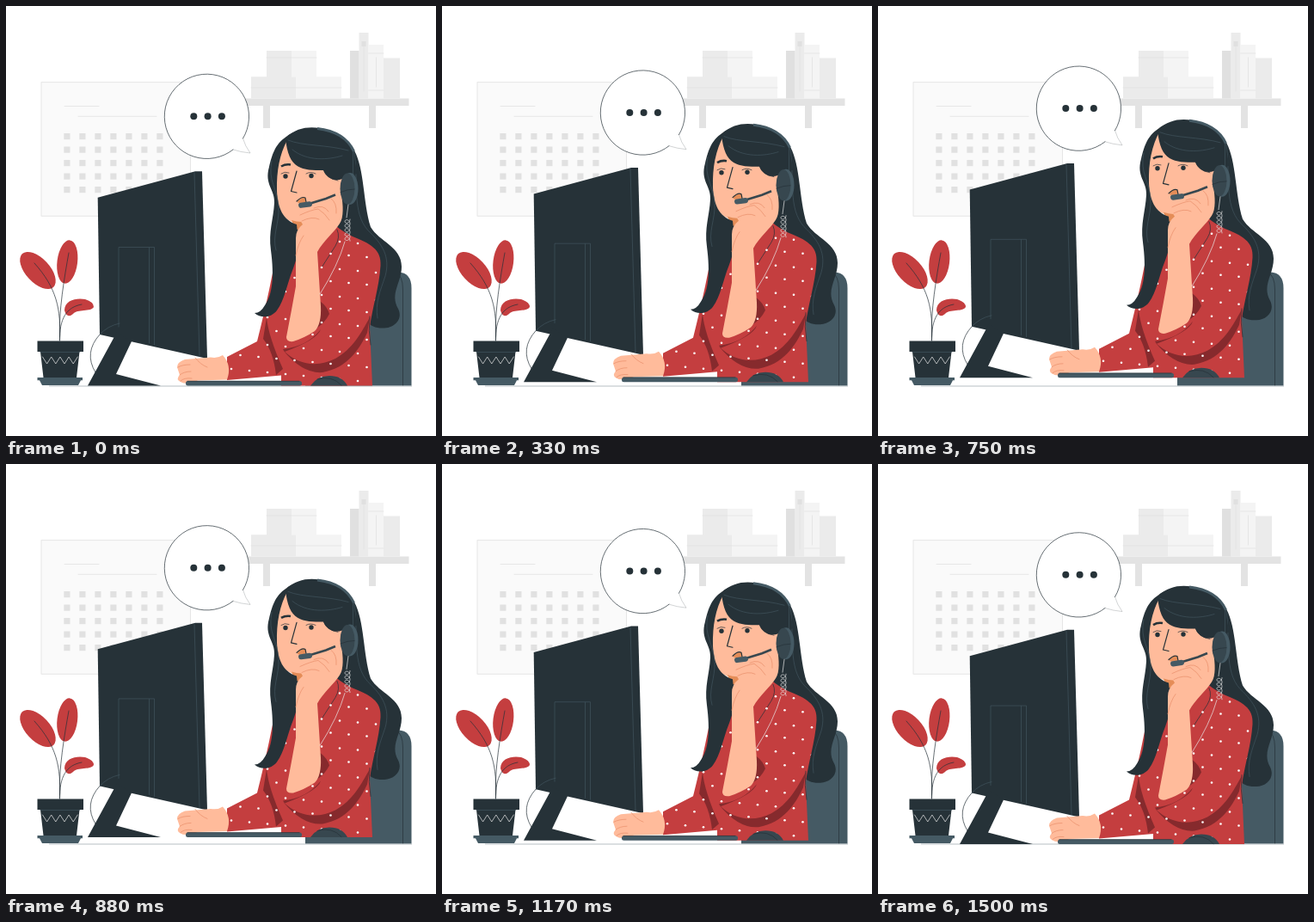
Write an HTML page that moves like this. It is 500 px wide and 500 px high and loops after 1.54 s.

```html
<!DOCTYPE html>
<html lang="en">
<head>
<meta charset="utf-8">
<title>Support agent</title>
<style>
html, body { margin: 0; width: 100%; height: 100%; overflow: hidden; background: #fff; }
svg { display: block; width: 100vw; height: 100vh; }
.dark { fill: #263238; }
.slate { fill: #455a64; }
.mid { fill: #37474f; }
.red { fill: #c43e3f; }
.shade { fill: #862a2d; }
.skin { fill: #ffbb9b; }
.tan { fill: #e58d58; }
.line, .soft, .crease, .pale, .wire { fill: none; stroke-linecap: round; stroke-linejoin: round; }
.line { stroke: #263238; stroke-width: .7; }
.bold { stroke-width: 1.2; }
.brow { stroke-width: 2.6; stroke-linecap: butt; }
.soft { stroke: #455a64; stroke-width: .6; }
.crease { stroke: #e98f6b; stroke-width: .7; }
.pale { stroke: #e0e0e0; stroke-width: .7; }
.wire { stroke: #e8e8e8; stroke-width: .7; }
</style>
</head>
<body>
<svg viewBox="0 0 500 500">
  <defs>
    <path id="blouse" d="M314 291L331 286L384 256Q391 262 403 268C423 276 437 283 435.500 302C434 327 426 350 423 374L426 441.500H320V429.500L257 435V408L292 390Q300 358 306 330z"/>
    <clipPath id="blouseClip"><use href="#blouse"/></clipPath>
  </defs>

  <g id="wall">
    <rect x="41" y="88.700" width="173.500" height="155.500" fill="#fafafa" stroke="#e0e0e0" stroke-width=".8"/>
    <path class="pale" d="M68 116.500h40M84 128.300h91"/>
    <g id="days" fill="#e1e1e1"></g>
    <path fill="#e3e3e3" d="M278 107.500h190.500v8.500H278zM299 116h8v26h-8zM422 116h8v26h-8z"/>
    <path fill="#ebebeb" d="M285 82.300h52v25.200h-52zM303 52h29v30.300h-29zM410.500 31h11v76.500h-11zM439 60.500h19v47h-19z"/>
    <path fill="#f4f4f4" d="M337 82.300h53v25.200h-53zM332 52h29v30.300h-29zM421.500 45h17.500v62.500h-17.500z"/>
    <path fill="#e0e0e0" d="M400 52h10.500v55.500H400zM413.500 41h5v6h-5z"/>
    <path class="pale" d="M303 60h58M285 95h105M416 47v52M421.500 55H439M421.500 98H439M430.500 60v34"/>
  </g>

  <g id="chair">
    <path class="slate" d="M415 309.500H456Q471.500 310 471.500 328V441.500H348V431H415z"/>
    <path class="line" d="M453 309.500Q461.500 313 461.500 330V441"/>
  </g>

  <g id="plant">
    <ellipse class="red" rx="26.500" ry="14" transform="translate(37 307.500) rotate(47)"/>
    <ellipse class="red" rx="25.300" ry="11.800" transform="translate(71.300 297.500) rotate(97)"/>
    <path class="red" d="M68 354C68 342 82 339 92 341Q102 344 102 350C99 356 83 352 78 358Q71 364 68 354z"/>
    <path class="line" d="M62.500 389C64 352 59 328 33 299M62.500 385C61 355 68 315 73 287M62.500 389C62 364 70 350 88 347"/>
    <path class="dark" d="M36.500 389.500H90V402H85.500L82 432H43.500L40 402H36.500z"/>
    <path class="soft" d="M40 402.500H85.500"/>
    <path id="zigzag" class="wire"/>
    <path class="slate" d="M36.500 432H89V435.300H87L84 441H42L39 435.300H36.500z"/>
  </g>

  <path d="M50 442H472" stroke="#9aa5ab" stroke-width=".7"/>

  <g id="float">
    <g id="bubble">
      <path fill="#fff" d="M264 167A49.200 49.200 0 1 1 275.500 154Q278 163 284 171Q273 170 264 167z"/>
      <path class="line" d="M264 167A49.200 49.200 0 1 1 275.500 154"/>
      <path class="line" stroke-opacity=".3" d="M275.500 154Q278 163 284 171Q273 170 264 167"/>
      <g id="typing" class="dark"></g>
    </g>

    <g id="hairBack">
      <path class="dark" d="M326 152C345 137 388 139 405 168C417 190 415 228 424 257C434 274 460 280 460 303C460 322 446 334 456 352C462 364 452 374 440 374.500C430 375 424 372 420 367L395 300H338V200z"/>
      <path class="soft" d="M405 170C410 205 402 240 421 261C438 277 447 292 441 314C435 332 429 345 432 363"/>
    </g>

    <g id="shirt">
      <use href="#blouse" class="red"/>
      <path class="shade" d="M303 362Q305 384 322 422L314 429Q311 402 299 387z"/>
      <path class="shade" d="M322 400C342 420 365 419 383 410C403 399 413 380 423 362L420 380C411 399 397 421 368 426Q345 428 322 400z"/>
      <path class="shade" d="M365 343Q374 350 376 358Q371 368 362 374zM322 399Q350 396 366 376Q362 388 324 402z"/>
      <path class="line" d="M385 260Q389 269 383 279L367 304M423 361Q421 377 424 394"/>
      <g id="spots" fill="#fff" clip-path="url(#blouseClip)"></g>
    </g>

    <g id="head">
      <path class="skin" d="M326 152C312 180 312 215 317 236Q325 254 349 253L384 247L394 210L388 170L355 148z"/>
      <path class="tan" d="M332 249Q346 254 359 247L357 260H336z"/>
      <path class="dark" d="M326 152C312 161 309 175 306 187C300 208 313 213 312 229C311 248 305 262 308 284C312 315 310 335 301 348Q296 357 289 357C297 364 309 362 315 354C324 342 326 325 334 305L341 284L338 254C322 249 316 235 315 215Q314 180 327 156z"/>
      <path class="soft" d="M309 180C304 204 316 212 317 234C318 252 309 268 314 284"/>
      <path class="dark" d="M325 153C338 142 350 140 365 142C392 146 406 166 408 195L391 201C381 205 372 199 369 191C345 191 328 191 325 153z"/>
      <path class="line" d="M369 190Q373 201 386 203"/>
      <path class="soft" d="M328 156C345 163 373 161 398 168M333 167C350 181 375 179 391 174"/>
      <path class="line brow" d="M320 186.500Q325 183.500 331 184.500"/>
      <g class="dark"><circle cx="325" cy="198" r="2.700"/><circle cx="355" cy="197.500" r="2.700"/></g>
      <path class="line" d="M320 195Q324 192 329 194M349 195Q354 192 360 195"/>
      <path class="line bold" d="M338 192L331.500 215.500L338 217"/>
      <path class="tan" d="M338 227Q345 221 348 223L349 229H340z"/>
      <path class="line bold" d="M338 227Q344 221 348 223L349 228"/>
    </g>

    <g id="arm">
      <path class="skin" d="M390 219C392 231 393 246 388 253C381 264 369 273 362 286L366 349Q367 370 359 378Q347 386 334 390Q326 391 326 385Q332 354 337 326V270Q337 260 345 254Q339 245 342 241L374 224Q383 219 387 212z"/>
      <path class="crease" d="M342 243Q355 237 363 236Q371 241 376 249M358 235Q369 230 375 239M344 250Q356 244 364 248M378 224Q385 229 384 241M337 290Q340 275 346 267"/>
    </g>

    <g id="headset">
      <path d="M362 142.500C384 145 398 155 404.500 169" fill="none" stroke="#455a64" stroke-width="3"/>
      <path class="soft" d="M403.500 167V196"/>
      <ellipse class="slate" cx="400" cy="212.500" rx="9.500" ry="18.500"/>
      <ellipse class="mid" cx="397" cy="212.500" rx="8.500" ry="18"/>
      <path d="M354 229.500L372 224L383 219.500" fill="none" stroke="#37474f" stroke-width="2.600"/>
      <path class="line" d="M389 216.500Q397 213 405 213"/>
      <rect class="slate" x="340" y="228" width="16" height="6.200" rx="3" transform="rotate(-8 348 231)"/>
      <path id="coil" class="wire"/>
      <path class="wire" d="M398 231L396 246M394 274Q386 302 365 335"/>
    </g>

    <g id="desk">
      <path class="dark" d="M106.700 222.800L220 192.200H228L234 410L109 382z"/>
      <path class="soft" d="M219 194L225 407M131 373V280.500H172.500V394M166.500 281V392"/>
      <path class="dark" d="M129 379L146 390L128 428L180 441.500H95z"/>
      <path class="line" d="M109 382Q90 403 104 426"/>
      <path class="soft" d="M109 382Q118 372 132 369"/>
      <path class="skin" d="M252 406Q246 410 238 408.500L208 411Q199 414 199 420L202 429Q197 434 203 437Q208 441 223 435.500L257 434.500Q263 418 252 406z"/>
      <path class="crease" d="M200 420Q205 417 214 417M202 429Q207 425 215 425M203 436Q207 432 216 433M220 409Q226 417 234 420"/>
      <rect class="slate" x="209" y="436" width="135" height="5.500" rx="2.500"/>
      <path class="line" d="M211 436.200H341"/>
      <path class="mid" d="M354 441.500Q362 430 376 430Q391 430 397 441.500z"/>
      <path class="line" d="M362 434Q379 429 390 441"/>
    </g>
  </g>
</svg>
<script>
const LOOP = 1540, STEPS = 37, RISE = 10;
const byId = id => document.getElementById(id);

function add(parent, tag, attrs) {
  const el = document.createElementNS("http://www.w3.org/2000/svg", tag);
  for (const k in attrs) el.setAttribute(k, attrs[k]);
  byId(parent).append(el);
}

// Joins count + 1 points given by a rule into one path.
function trace(id, count, point) {
  const pts = Array.from({ length: count + 1 }, (_, i) => point(i).join(" "));
  byId(id).setAttribute("d", "M" + pts.join("L"));
}

for (let row = 0; row < 5; row++)
  for (let col = 0; col < 7; col++)
    add("days", "rect", { x: 67.3 + col * 18, y: 148 + row * 15.5, width: 7.2, height: 7.2 });

for (let i = 0; i < 3; i++)
  add("typing", "circle", { cx: 218.3 + i * 16.3, cy: 128.2, r: 4 });

// Staggered rows, slightly tilted and cut to the blouse.
for (let row = 0; row < 12; row++)
  for (let col = 0; col < 9; col++)
    add("spots", "circle", {
      cx: 262 + col * 21 + row % 2 * 10.5,
      cy: 262 + row * 16 + col * 2,
      r: 1.3
    });

trace("zigzag", 8, i => [42.5 + i * 5.1, i % 2 ? 416 : 408]);
trace("coil", 90, i => {
  const a = i / 90 * Math.PI * 10;
  return [397 + 3 * Math.cos(a), 248 + i * .28 + 3 * Math.sin(a)];
});

// Linear rise and fall, drawn in even steps.
function draw(now) {
  const step = Math.floor((now % LOOP + 5) * STEPS / LOOP) % STEPS;
  const phase = (step + 1) / STEPS % 1;
  const y = .54 - RISE * (1 - Math.abs(1 - 2 * phase));
  byId("float").setAttribute("transform", `translate(0 ${y.toFixed(3)})`);
}

const start = performance.now();
function tick() {
  draw(performance.now() - start);
  requestAnimationFrame(tick);
}
tick();
</script>
</body>
</html>
```
